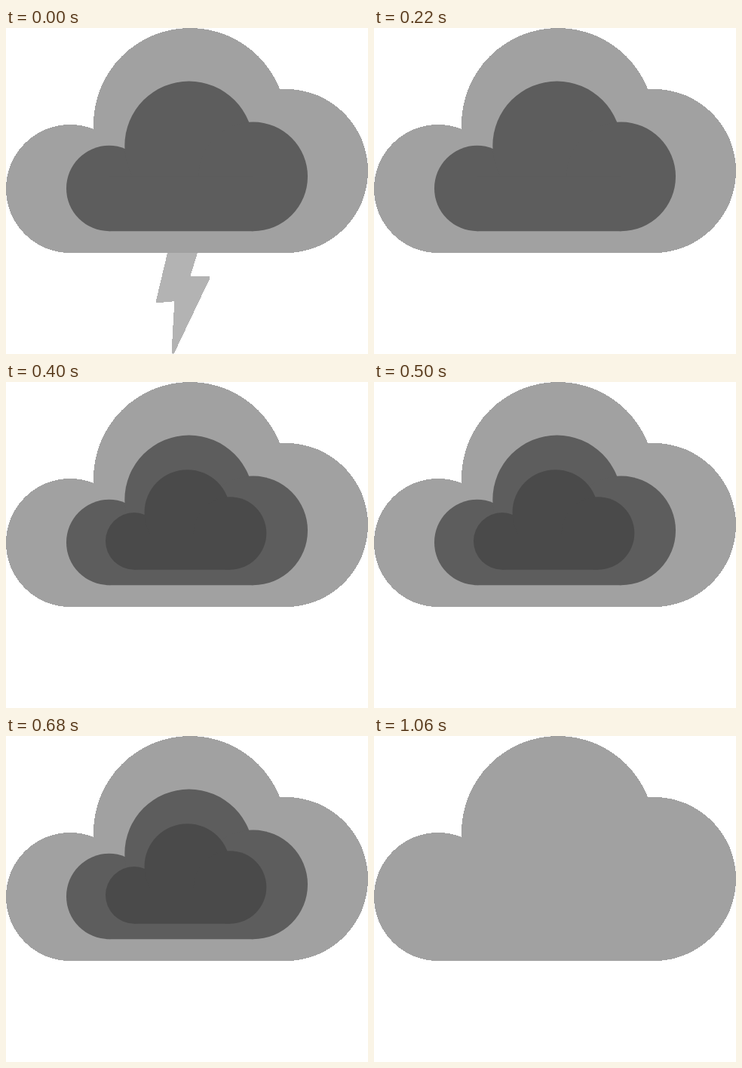
These frames come from a looping animation (480 px wide and 432 px high, 1200 ms). An HTML page:

```html
<!DOCTYPE html>
<html lang="en">
<head>
<meta charset="utf-8">
<title>Thunder cloud</title>
<style>
  html, body { margin: 0; width: 100%; height: 100%; overflow: hidden; background: #fff; }
  svg { display: block; }
  .crisp { shape-rendering: crispEdges; }
</style>
</head>
<body>
<svg width="480" height="432" viewBox="0 0 480 432">
  <defs>
    <g id="cloud">
      <circle cx="85" cy="213" r="85"/>
      <circle cx="244" cy="128" r="128"/>
      <circle cx="371.5" cy="189.5" r="108.5"/>
      <path d="M85 189H371.5V298H85Z"/>
    </g>
  </defs>
  <!-- The round stroke softens the corners of the bolt -->
  <path id="bolt" class="crisp" fill="#b3b3b3" stroke="#b3b3b3" stroke-width="4" stroke-linejoin="round"
    d="M217.5 292H253.7L241.7 331H268.5L221.5 429.5L225.5 360L200.8 362.3Z"/>
  <use href="#cloud" class="crisp" fill="#a1a1a1"/>
  <use href="#cloud" id="middle" fill="#5d5d5d" transform="translate(80 70.5) scale(.6667)"/>
  <use href="#cloud" id="core" fill="#4a4a4a" transform="translate(132 116.2) scale(.4444)"/>
</svg>
<script>
const LOOP = 1200;
const FLASH_PERIOD = 280;
const FLASH_LENGTH = 120;
const CORE_START = 400;
const STORM_END = 840;

const [bolt, middle, core] = ['bolt', 'middle', 'core'].map(id => document.getElementById(id));

function show(part, on) {
  part.style.visibility = on ? 'visible' : 'hidden';
}

function draw(time) {
  const t = time % LOOP;
  const storm = t < STORM_END;
  show(bolt, storm && t % FLASH_PERIOD < FLASH_LENGTH);
  show(middle, storm);
  show(core, storm && t >= CORE_START);
}

const start = performance.now();
function tick() {
  draw(performance.now() - start);
  requestAnimationFrame(tick);
}
tick();
</script>
</body>
</html>
```
